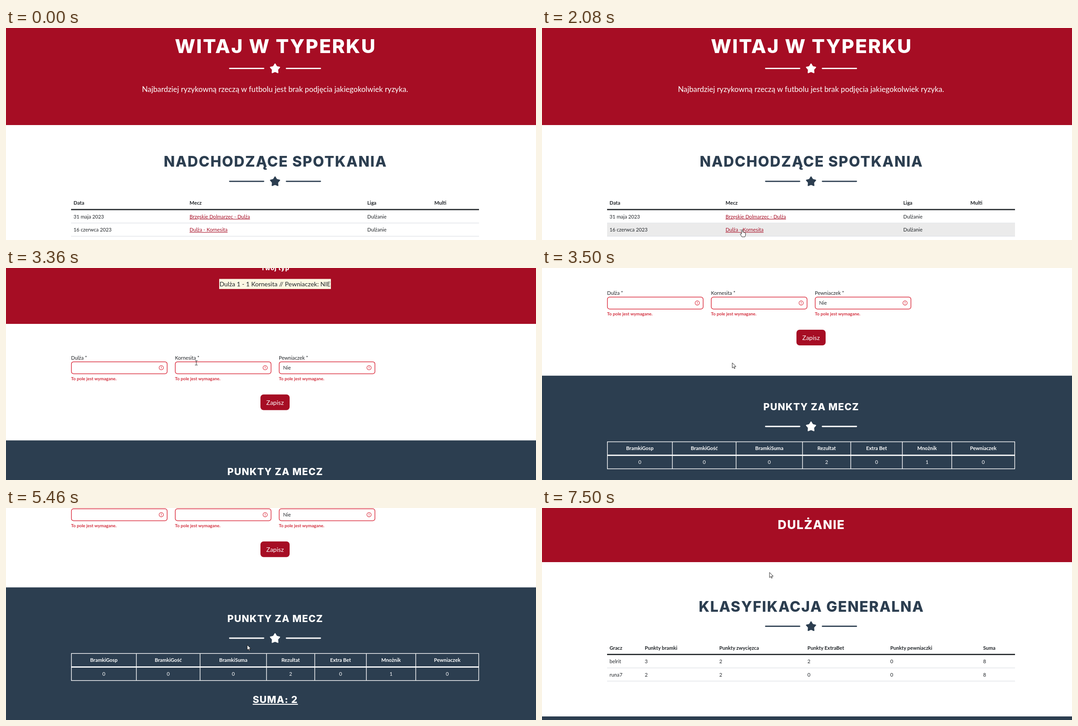
Write an HTML page that moves like this. It is 1181x474 px and loops after 8000 ms.

```html
<!DOCTYPE html>
<html lang="pl">
<head>
<meta charset="utf-8">
<style>
  html, body { margin: 0; height: 100%; overflow: hidden; background: #fff; }
  svg { display: block; width: 100vw; height: 100vh; }
  text { font: 400 11.22px Lato, sans-serif; fill: #212529; white-space: pre; }
  .b { font-weight: 700; }
  .h { font-family: Inter, sans-serif; font-weight: 800; letter-spacing: .054em; }
  .m { text-anchor: middle; }
  .u { text-decoration: underline; }
</style>
</head>
<body>
<svg id="stage" viewBox="0 0 1181 474"></svg>
<script>
const RED = '#a60d24', NAVY = '#2c3e50', INK = '#212529', ERR = '#dc3545';
const MID = 599.5, LEFT = 145, RIGHT = 1054, BODY = 11.22;
const HOME = 'Dulża', AWAY = 'Kornesita', LEAGUE = 'Dulżanie';

const rect = (x, y, w, h, fill, more = '') =>
  `<rect x="${x}" y="${y}" width="${w}" height="${h}" fill="${fill}" ${more}/>`;
const band = (y, h, fill) => rect(0, y, 1181, h, fill);
const text = (s, x, y, cls = '', size = BODY, fill = INK) =>
  `<text x="${x}" y="${y}" class="${cls}" style="font-size:${size}px;fill:${fill}">${s}</text>`;
const head = (s, x, y, size, fill = '#fff', cls = '') =>
  text(s, x + size * .027, y, 'h m ' + cls, size, fill);

function divider(y, fill) {
  const points = Array.from({ length: 10 }, (_, i) => {
    const r = i % 2 ? 6.1 : 10.8, a = (i / 5 - .5) * Math.PI;
    return [MID + r * Math.cos(a), y + .8 + r * Math.sin(a)].map(v => v.toFixed(2));
  }).join(' ');
  const bar = x => rect(x, y - 1.4, 78.5, 2.8, fill, 'rx="1.4"');
  return bar(497) + bar(623.5) +
    `<polygon points="${points}" fill="${fill}" stroke="${fill}" stroke-width="2.2" stroke-linejoin="round"/>`;
}

// Plain table: bold header over a thick rule, then 29.5px rows
function table(y, cols, header, rows, linkCol) {
  let out = header.map((s, i) => text(s, cols[i], y, 'b')).join('');
  out += rect(LEFT, y + 9.6, RIGHT - LEFT, 2.7, INK);
  rows.forEach((row, r) => {
    const base = y + 30.8 + r * 29.5;
    out += rect(LEFT, base + 9.6, RIGHT - LEFT, 1.3, '#dee2e6');
    out += row.map((s, i) => i === linkCol
      ? text(s, cols[i], base, 'u', BODY, RED)
      : text(s, cols[i], base)).join('');
  });
  return out;
}

function field(x, label, value) {
  return text(label + ' *', x, 386) +
    rect(x + .7, 390.7, 213.4, 26.8, '#fff', `rx="5" stroke="${ERR}" stroke-width="1.5"`) +
    `<g fill="none" stroke="${ERR}" stroke-width="1.2"><circle cx="${x + 201}" cy="404" r="4.8"/>
     <path d="M${x + 201} 401.2v3.3m0 1.1v1.3"/></g>` +
    text(value, x + 9.5, 408) +
    text('To pole jest wymagane.', x, 432, 'b', 9.82, '#d32f3e');
}

function pointsTable() {
  const edges = [145.7, 290.5, 432.5, 580.5, 688, 803, 913, 1053.4];
  const names = ['BramkiGosp', 'BramkiGość', 'BramkiSuma', 'Rezultat', 'Extra Bet', 'Mnożnik', 'Pewniaczek'];
  const values = [0, 0, 0, 2, 0, 1, 0];
  let out = edges.map(x => rect(x - .7, 714, 1.4, 61, '#fff')).join('');
  out += rect(LEFT, 713.6, 909, 1.4, '#fff') + rect(LEFT, 743.1, 909, 2.8, '#fff') + rect(LEFT, 774, 909, 1.4, '#fff');
  names.forEach((s, i) => {
    const x = (edges[i] + edges[i + 1]) / 2;
    out += text(s, x, 733.2, 'b m', BODY, '#fff') + text(values[i], x, 764, 'm', BODY, '#fff');
  });
  return out;
}

const welcome = band(0, 217, RED) +
  head('WITAJ W TYPERKU', MID, 56, 43.1) + divider(90.4, '#fff') +
  text('Najbardziej ryzykowną rzeczą w futbolu jest brak podjęcia jakiegokolwiek ryzyka.', MID, 143, 'm', 16.81, '#fff') +
  head('NADCHODZĄCE SPOTKANIA', MID, 310, 32.3, NAVY) + divider(342.8, NAVY) +
  rect(LEFT, 0, RIGHT - LEFT, 28.3, '#ebebeb', 'id="hover"') +
  table(395, [150.5, 409, 805, 954.5], ['Data', 'Mecz', 'Liga', 'Multi'], [
    ['31 maja 2023', 'Brzęskie Dolmarzec - ' + HOME, LEAGUE],
    ['16 czerwca 2023', `${HOME} - ${AWAY}`, LEAGUE]
  ], 1);

const match = band(0, 306, RED) +
  head(HOME.toUpperCase(), 502.5, 41.6, 21.5) + head(AWAY.toUpperCase(), 696, 41.6, 21.5) +
  head('0', 502.3, 79.6, 21.5) + head('0', 696, 79.6, 21.5) +
  divider(127.6, NAVY) + head('Twój typ', MID, 186, 13.6) +
  rect(475, 205.5, 249, 22.5, '#fcf8e3') +
  text(`${HOME} 1 - 1 ${AWAY} // Pewniaczek: NIE`, MID, 222, 'm', 14) +
  field(145, HOME, '') + field(376.5, AWAY, '') + field(608, 'Pewniaczek', 'Nie') +
  rect(567, 463.8, 65, 35, RED, 'rx="7"') + text('Zapisz', MID, 487, 'm', 14, '#fff') +
  band(566.5, 400, NAVY) + head('PUNKTY ZA MECZ', MID, 643.8, 21.5) + divider(680, '#fff') +
  pointsTable() + head('SUMA: 2', MID, 824.8, 21.5, '#fff', 'u');

const ranking = band(0, 121, RED) + head(LEAGUE.toUpperCase(), MID, 47, 27) +
  head('KLASYFIKACJA GENERALNA', MID, 231.5, 32.3, NAVY) + divider(264.4, NAVY) +
  table(316.5, [150.5, 229, 395, 591.5, 776, 983],
    ['Gracz', 'Punkty bramki', 'Punkty zwycięzca', 'Punkty ExtraBet', 'Punkty pewniaczki', 'Suma'],
    [['belrit', 3, 2, 2, 0, 8], ['runa7', 2, 2, 0, 0, 8]]) +
  band(466, 8, NAVY);

const cursors = {
  arrow: 'M0 0V11.6L2.7 9.1 4.4 13 6.2 12.2 4.5 8.4H8.2Z',
  hand: 'M-1.3 10V1.2Q-1.3 0 0 0T1.3 1.2V5.5Q2.8 4.8 3.6 6.2Q5 5.6 5.7 6.9Q7.5 6.5 7.6 8.3V11Q7.4 13.5 6 16H-.6Q-1.5 14-3.8 10.8Q-4.8 9-3.4 8.7Q-2.3 8.6-1.3 10Z',
  beam: 'M-3 -5H-.7L0 -4.4 .7 -5H3M0 -4.4V4.4M-3 5H-.7L0 4.4 .7 5H3'
};

const stage = document.getElementById('stage');
stage.innerHTML = band(0, 474, '#fff') +
  [welcome, match, ranking].map(s => `<g class="page">${s}</g>`).join('') +
  '<path id="cursor" fill="#fff" stroke="#111" stroke-width=".9" stroke-linejoin="round"/>';
const pages = stage.querySelectorAll('.page');
const hover = document.getElementById('hover');
const cursor = document.getElementById('cursor');

// time, x, y
const track = [
  [590, 600, 18], [900, 520, 190], [1340, 446, 451], [2680, 446, 451],
  [3090, 424, 212], [4230, 424, 212], [4300, 422, 224], [4560, 560, 240],
  [4800, 686, 330], [5040, 645, 405], [5250, 560, 432], [5400, 526, 350],
  [5560, 575, 247], [5700, 641, 275], [5880, 592, 432], [5950, 584, 437],
  [6300, 586, 433], [6910, 586, 433], [7500, 507, 144], [8000, 507, 144]
];
const scrollTrack = [[3200, 0], [3220, 30], [3360, 180], [3500, 325], [3640, 389]];

// Smooth curve through the keys, constant before the first and after the last
function sample(keys, t, k) {
  const n = keys.length - 1;
  if (t <= keys[0][0]) return keys[0][k];
  if (t >= keys[n][0]) return keys[n][k];
  const i = keys.findIndex(p => p[0] > t) - 1;
  const a = keys[i], b = keys[i + 1];
  if (a[k] === b[k]) return a[k];
  const span = b[0] - a[0], u = (t - a[0]) / span;
  const slope = (p, q) => (q[k] - p[k]) / (q[0] - p[0]) * span;
  const m0 = slope(keys[Math.max(i - 1, 0)], b);
  const m1 = slope(a, keys[Math.min(i + 2, n)]);
  const u2 = u * u, u3 = u2 * u, e = 3 * u2 - 2 * u3;
  return a[k] + (b[k] - a[k]) * e + m0 * (u3 - 2 * u2 + u) + m1 * (u3 - u2);
}

function draw(t) {
  const page = t < 2350 ? 0 : t < 6910 ? 1 : 2;
  pages.forEach((p, i) => p.style.display = i === page ? '' : 'none');
  pages[1].setAttribute('transform', `translate(0 ${-sample(scrollTrack, t, 1)})`);

  const x = sample(track, t, 1), y = sample(track, t, 2);
  const inside = (x0, x1, y0, y1) => x >= x0 && x <= x1 && y >= y0 && y <= y1;
  const row = t < 590 ? -1 : Math.floor((y - 407.3) / 29.5);
  hover.style.display = row === 0 || row === 1 ? '' : 'none';
  hover.setAttribute('y', 407.3 + row * 29.5);

  let kind = 'arrow';
  if (page === 0 && (inside(409, 543, 415, 429) || inside(409, 493, 445, 459))) kind = 'hand';
  if (page === 1 && t > 5000 && inside(551, 648, 415, 441)) kind = 'hand';
  if (t >= 3290 && t < 3500) kind = 'beam';
  cursor.setAttribute('d', cursors[kind]);
  cursor.setAttribute('fill', kind === 'beam' ? 'none' : '#fff');
  cursor.setAttribute('transform', `translate(${x} ${y})`);
  cursor.style.display = t < 590 ? 'none' : '';
}

const start = performance.now();
function tick() {
  draw((performance.now() - start) % 8000);
  requestAnimationFrame(tick);
}
tick();
</script>
</body>
</html>
```
